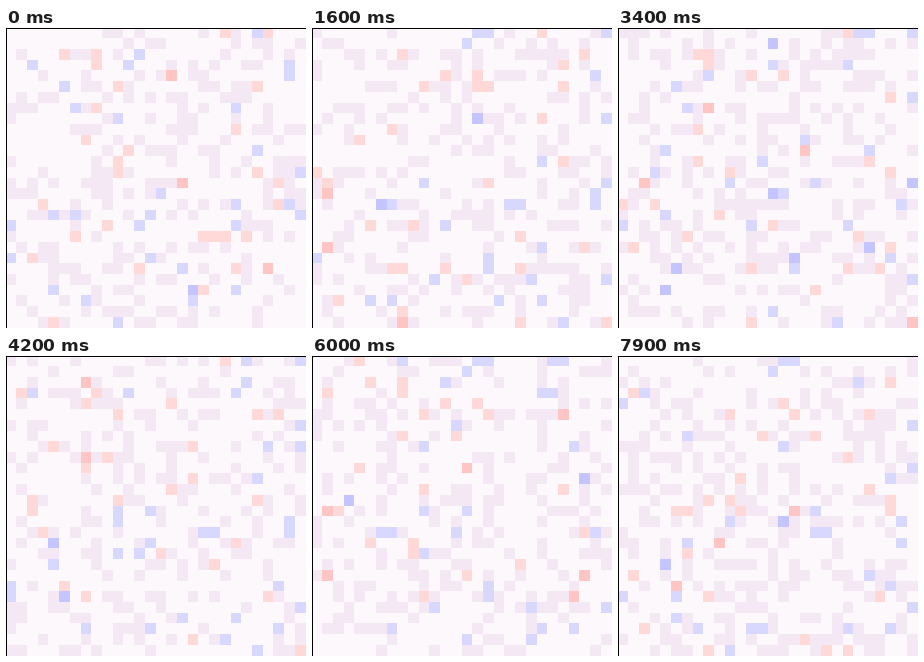
These frames come from a looping animation (300x300 px, 8 s). An HTML page with a canvas:

```html
<!DOCTYPE html>
<html lang="en">
<head>
<meta charset="utf-8">
<title>Flickering grid</title>
<style>
  html, body { margin: 0; width: 100%; height: 100%; overflow: hidden; background: #000; }
  canvas { display: block; width: 100vw; height: 100vh; image-rendering: pixelated; }
</style>
</head>
<body>
<canvas id="stage" width="300" height="300"></canvas>
<script>
const ctx = document.getElementById('stage').getContext('2d');
const STAGE = 300, SIZE = 28, STEP = 100, LOOP = 8000;
const PAPER = '#fcf8fc', LILAC = '#f3e8f4';
const BLUE = { soft: '#d8d8ff', strong: '#c4c4ff' };
const RED = { soft: '#ffd8d8', strong: '#ffc4c4' };

// Repeatable random value in 0..1 for a cell and a channel
function noise(cell, channel) {
  let h = Math.imul(cell + 1, 0x9e3779b1) ^ Math.imul(channel + 7, 0x85ebca6b);
  h = Math.imul(h ^ (h >>> 15), 0x2c1b3c6d);
  h = Math.imul(h ^ (h >>> 12), 0x297a2d39);
  return ((h ^ (h >>> 15)) >>> 0) / 2 ** 32;
}

// Each cell keeps its own tint; only some cells ever light up
const sites = Array.from({ length: SIZE * SIZE }, (_, i) => ({
  tint: noise(i, 901) < 0.5 ? BLUE : RED,
  chance: noise(i, 902) < 0.3 ? 0.1 + 0.36 * noise(i, 903) : 0
}));

const edge = n => Math.floor(n * STAGE / SIZE);

function cellColor(site, i, step) {
  if (noise(i, step) < site.chance) {
    return noise(i, step + 200) < 0.1 ? site.tint.strong : site.tint.soft;
  }
  return noise(i, step + 400) < 0.3 ? LILAC : PAPER;
}

function draw(step) {
  sites.forEach((site, i) => {
    const col = i % SIZE, row = Math.floor(i / SIZE);
    const x = edge(col), y = edge(row);
    ctx.fillStyle = cellColor(site, i, step);
    ctx.fillRect(x, y, edge(col + 1) - x, edge(row + 1) - y);
  });
  // Border along the top and left
  ctx.fillStyle = '#000';
  ctx.fillRect(0, 0, STAGE, 1);
  ctx.fillRect(0, 0, 1, STAGE);
}

const start = performance.now();
let shown = -1;

function tick() {
  const time = (performance.now() - start) % LOOP;
  const step = Math.floor(time / STEP);
  if (step !== shown) draw(shown = step);
  requestAnimationFrame(tick);
}
tick();
</script>
</body>
</html>
```
